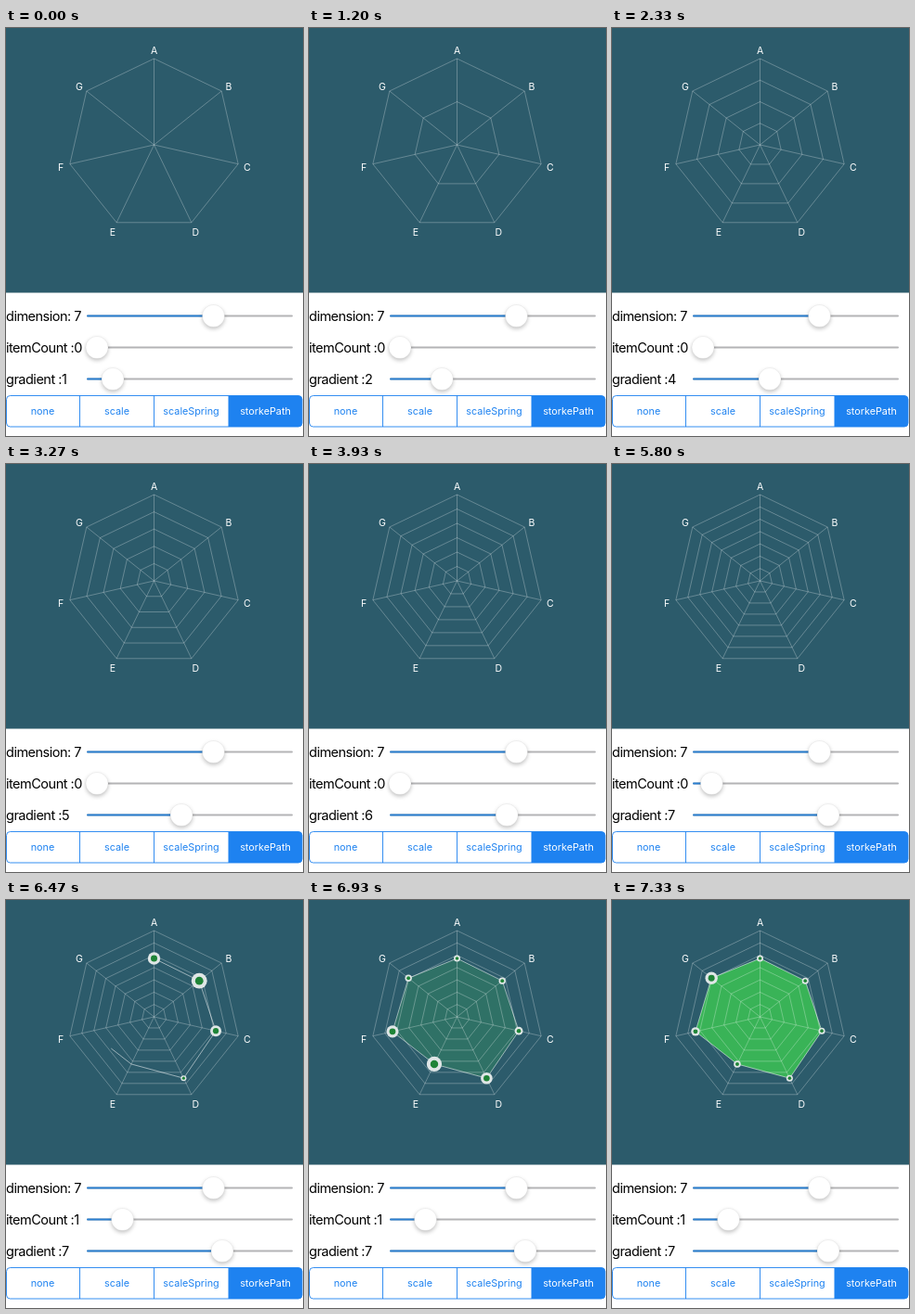
Recreate the animation shown at these times as an HTML page. Size 320 by 440 pixels, loop 7390 ms.

```html
<!DOCTYPE html>
<html lang="en">
<head>
<meta charset="utf-8">
<title>Radar chart</title>
<style>
  html, body { margin: 0; width: 100%; height: 100%; overflow: hidden; background: #fff; }
  svg { display: block; width: 320px; height: 440px; font-family: Inter, "Liberation Sans", sans-serif; }
  .label { font-size: 14.5px; letter-spacing: -.5px; fill: #000; }
  .tag { font-size: 10.5px; fill: #fff; text-anchor: middle; }
  .tab { font-size: 10.8px; text-anchor: middle; }
  .web { fill: none; stroke: #fff; stroke-opacity: .5; stroke-width: .55; }
  .thumb { fill: #fff; stroke: #000; stroke-opacity: .1; stroke-width: .5; filter: drop-shadow(0 2.5px 2px rgba(0, 0, 0, .24)); }
</style>
</head>
<body>
<svg id="stage" viewBox="0 0 320 440"></svg>
<script>
const LOOP = 7390;
const CX = 159.5, CY = 126, R = 93, SIDES = 7;
const BLUE = '#1e82f0';
const VALUES = [.677, .67, .734, .79, .608, .767, .72];

// [time, value] steps, linear in between
const GRADIENT_X = [[0, 115], [330, 122], [470, 122], [730, 131], [870, 131], [1600, 158], [1670, 158],
  [2130, 170], [2330, 170], [3000, 188.4], [3270, 189], [3800, 209], [4550, 233]];
const ITEM_X = [[5050, 98], [5450, 100], [5830, 108], [6250, 125.5]];
const PULSE = [[0, 0], [130, 3], [275, 6], [420, 8.5], [570, 6.6], [720, 4.5], [870, 3.7], [1000, 3.5]];
const DRAW_AT = 5832, DRAW_MS = 1000;
const DOTS_AT = 5911, DOT_GAP = DRAW_MS / SIDES;
const FILL_AT = 6800, FILL_MS = 600;

const stage = document.getElementById('stage');

function add(tag, attrs, text) {
  const el = document.createElementNS('http://www.w3.org/2000/svg', tag);
  set(el, attrs);
  if (text !== undefined) el.textContent = text;
  stage.append(el);
  return el;
}

function set(el, attrs) {
  for (const key in attrs) el.setAttribute(key, attrs[key]);
}

function at(steps, t) {
  if (t <= steps[0][0]) return steps[0][1];
  for (let i = 1; i < steps.length; i++) {
    const [t0, a] = steps[i - 1], [t1, b] = steps[i];
    if (t < t1) return a + (b - a) * (t - t0) / (t1 - t0);
  }
  return steps[steps.length - 1][1];
}

const clamp = v => Math.max(0, Math.min(1, v));

function point(i, r) {
  const a = i * 2 * Math.PI / SIDES;
  return [CX + r * Math.sin(a), CY - r * Math.cos(a)];
}

function polygon(radius) {
  return 'M' + VALUES.map((_, i) => point(i, radius(i)).map(v => v.toFixed(2))).join('L') + 'Z';
}

function webPath(rings) {
  let d = '';
  for (let k = 1; k <= rings; k++) d += polygon(() => R * k / rings);
  for (let i = 0; i < SIDES; i++) d += `M${CX},${CY}L${point(i, R)}`;
  return d;
}

function slider(y, name) {
  const label = add('text', { class: 'label', x: 0, y: y + 5.4 });
  add('rect', { x: 87, y: y - 1, width: 222, height: 2, rx: 1, fill: '#b4b4b6' });
  const bar = add('rect', { x: 87, y: y - 1, height: 2, rx: 1, fill: '#2a80d2' });
  const thumb = add('circle', { class: 'thumb', cy: y, r: 12 });
  return (x, value) => {
    label.textContent = name + value;
    set(bar, { width: x - 87 });
    set(thumb, { cx: x });
  };
}

// Chart
add('rect', { width: 320, height: 285.5, fill: '#2c5b6b' });
const shape = polygon(i => R * VALUES[i]);
const area = add('path', { d: shape, fill: '#3bbf55' });
const web = add('path', { class: 'web' });
const outline = add('path', {
  d: shape, fill: 'none', stroke: '#fff', 'stroke-opacity': .75, 'stroke-width': .7,
  pathLength: 1, 'stroke-dasharray': '1 2'
});
const dots = VALUES.map((v, i) => {
  const [cx, cy] = point(i, R * v);
  return [add('circle', { cx, cy, fill: '#dfe6e6' }), add('circle', { cx, cy, fill: '#1f8437' })];
});
[...'ABCDEFG'].forEach((name, i) => {
  const [x, y] = point(i, 103);
  add('text', { class: 'tag', x, y: y + 4.9 }, name);
});

// Controls
const setDimension = slider(310.5, 'dimension: ');
const setItems = slider(344.5, 'itemCount :');
const setGradient = slider(378.5, 'gradient :');
setDimension(223.5, SIDES);

add('path', { d: 'M239.5 396.5H315a4 4 0 0 1 4 4V426a4 4 0 0 1-4 4H239.5Z', fill: BLUE });
add('rect', { x: .5, y: 396.5, width: 318.5, height: 33.5, rx: 4, fill: 'none', stroke: BLUE, 'stroke-width': .9 });
add('path', { d: 'M79.5 396.5v33.5M159.5 396.5v33.5', stroke: BLUE, 'stroke-width': .9 });
['none', 'scale', 'scaleSpring', 'storkePath'].forEach((name, i) => {
  add('text', { class: 'tab', x: 39.5 + 80 * i, y: 416.6, fill: i === 3 ? '#fff' : BLUE }, name);
});

let rings = 0;

function render(t) {
  const gx = at(GRADIENT_X, t), ix = at(ITEM_X, t);
  const level = Math.round((gx - 98) / 20);
  setGradient(gx, level);
  setItems(ix, t < DRAW_AT ? 0 : 1);
  if (level !== rings) {
    rings = level;
    set(web, { d: webPath(rings) });
  }

  const drawn = clamp((t - DRAW_AT) / DRAW_MS);
  set(outline, { 'stroke-dashoffset': 1 - drawn, visibility: drawn > 0 ? 'visible' : 'hidden' });
  set(area, { opacity: clamp((t - FILL_AT) / FILL_MS) });
  dots.forEach(([rim, core], i) => {
    const r = at(PULSE, t - DOTS_AT - i * DOT_GAP);
    set(rim, { r });
    set(core, { r: r * .52 });
  });
}

const start = performance.now();
function tick() {
  render((performance.now() - start) % LOOP);
  requestAnimationFrame(tick);
}
tick();
</script>
</body>
</html>
```
